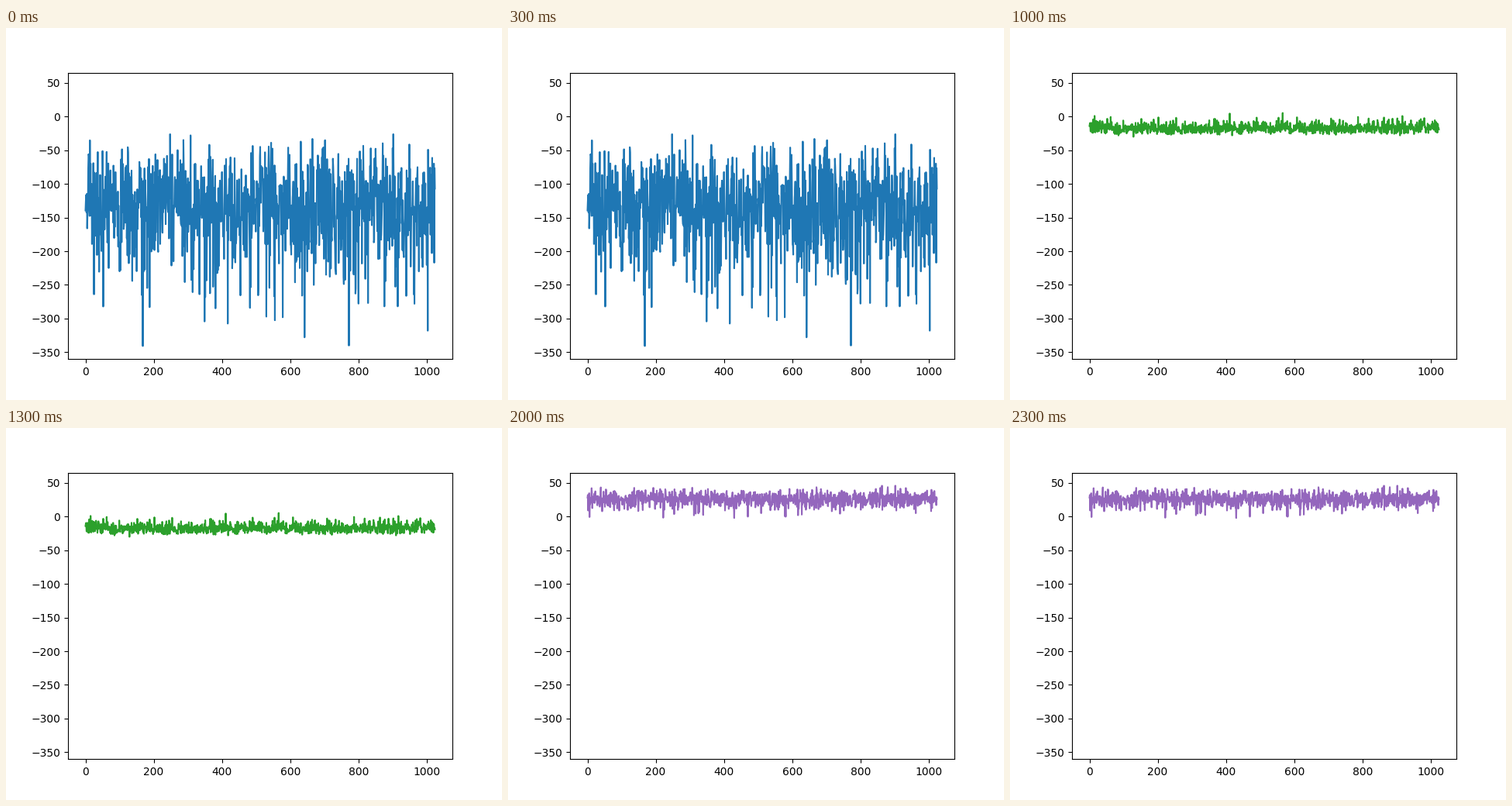
A matplotlib script for the animation above (2500 ms loop, 640 by 480 pixels).

```python
import matplotlib.pyplot as plt
import numpy as np
from matplotlib.animation import ArtistAnimation

COUNT = 1025
rng = np.random.default_rng(7)


def trace(mean, spread, shape, lowest, highest):
    """Gamma noise, mirrored for a negative shape, between two (x, y) extremes."""
    k = abs(shape)
    noise = (rng.gamma(k, size=COUNT) - k) / np.sqrt(k)
    y = mean + np.sign(shape) * spread * noise
    # Fold anything beyond the extremes back inside.
    low, high = lowest[1], highest[1]
    y = np.where(y < low, 2 * low - y, y)
    y = np.where(y > high, 2 * high - y, y)
    for x, value in (lowest, highest):
        y[x] = value
    return y


traces = [
    trace(-144, 53, -14, (168, -340.95), (902, -26)),
    trace(-26, 2.7, 14, (101, -33), (74, -15)),
    trace(-17, 5.4, 6, (129, -30), (566, 5.5)),
    trace(3, 8.2, 60, (555, -21), (337, 28)),
    trace(26, 7.8, -40, (430, -2), (902, 46.05)),
]

fig, ax = plt.subplots(figsize=(6.4, 4.8), dpi=100)
frames = [ax.plot(y) for y in traces]

anim = ArtistAnimation(fig, frames, interval=500, repeat=True, repeat_delay=0)
plt.show()
```
